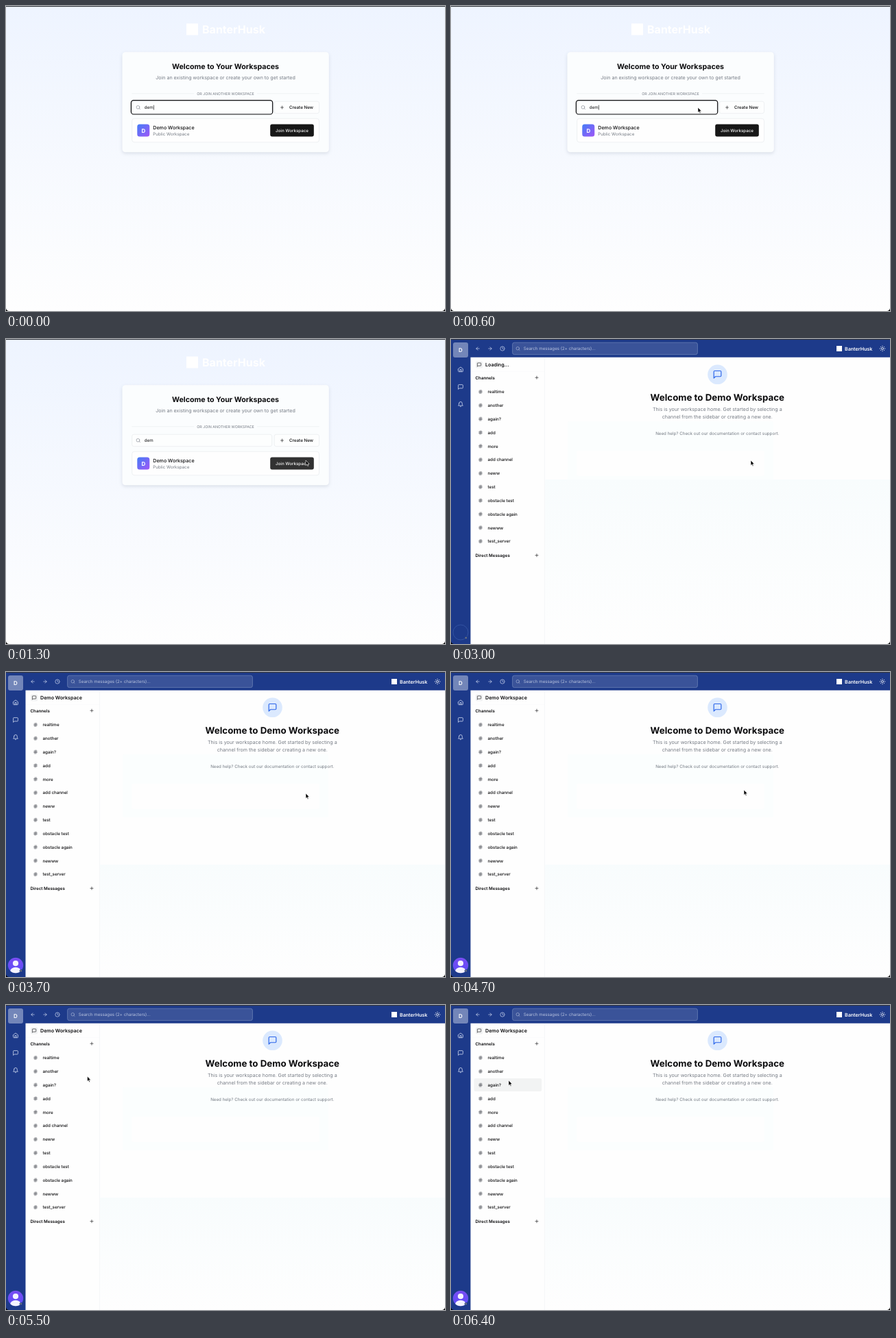
Animation, 640 px wide and 445 px high, one loop 8 s. Source, as an HTML page:

```html
<!DOCTYPE html>
<html lang="en">
<head>
<meta charset="utf-8">
<title>Workspace join</title>
<style>
  html, body { margin: 0; width: 100%; height: 100%; overflow: hidden; background: #fff; }
  svg { display: block; width: 640px; height: 445px; }
  text {
    font-family: Inter, "Liberation Sans", sans-serif;
    font-optical-sizing: none;
    text-rendering: geometricPrecision;
    white-space: pre;
  }
  #card { filter: drop-shadow(0 2px 2.5px rgba(30, 50, 80, .13)); }
</style>
</head>
<body>
<svg id="stage" viewBox="0 0 640 445"></svg>
<script>
const LOOP = 8000, TICK = 100;
const BRAND = 'BanterHusk';
const BLUE = '#1d3a8a', INK = '#0c0c0e', GREY = '#747a83', LINE = '#e5e8eb', PALE = '#dce5f8';
// Type sizes: 12, 14, 16, 24, 30 and 36 px at a 4:9 scale
const XS = 5.333, SM = 6.222, MD = 7.111, XL = 10.667, H2 = 13.333, H1 = 16;

const ICONS = {
  plus: 'M5 12h14M12 5v14',
  search: 'M19 11a8 8 0 1 1-16 0a8 8 0 0 1 16 0M21 21l-4.3-4.3',
  bubble: 'M21 15a2 2 0 0 1-2 2H7l-4 4V5a2 2 0 0 1 2-2h14a2 2 0 0 1 2 2z',
  hash: 'M4 9h16M4 15h16M10 3L8 21M16 3l-2 18',
  home: 'M3 10l9-7 9 7v9a2 2 0 0 1-2 2H5a2 2 0 0 1-2-2zM9 21v-8h6v8',
  bell: 'M6 8a6 6 0 0 1 12 0c0 7 3 9 3 9H3s3-2 3-9M10.3 21a2 2 0 0 0 3.4 0',
  left: 'M12 19l-7-7 7-7M19 12H5',
  right: 'M12 5l7 7-7 7M5 12h14',
  clock: 'M22 12a10 10 0 1 1-20 0a10 10 0 0 1 20 0M12 6v6l4 2',
  sun: 'M16 12a4 4 0 1 1-8 0a4 4 0 0 1 8 0M12 2v2M12 20v2M4.9 4.9l1.4 1.4M17.7 17.7l1.4 1.4M2 12h2M20 12h2M6.3 17.7l-1.4 1.4M19.1 4.9l-1.4 1.4'
};

const text = (x, cy, str, size, weight = 400, fill = INK, anchor = 'start', id = '') =>
  `<text ${id && `id="${id}"`} x="${x}" y="${cy + size * .364}" font-size="${size}" font-weight="${weight}" fill="${fill}" text-anchor="${anchor}">${str}</text>`;

const mid = (x, cy, str, size, weight, fill) => text(x, cy, str, size, weight, fill, 'middle');

const box = (x, y, w, h, r, fill, extra = '') =>
  `<rect x="${x}" y="${y}" width="${w}" height="${h}" rx="${r}" fill="${fill}" ${extra}/>`;

const edge = (color, width = .6) => `stroke="${color}" stroke-width="${width}"`;

const icon = (name, cx, cy, size, color) =>
  `<path d="${ICONS[name]}" transform="translate(${cx - size / 2} ${cy - size / 2}) scale(${size / 24})" fill="none" stroke="${color}" stroke-width="2" stroke-linecap="round" stroke-linejoin="round"/>`;

const channels = ['realtime', 'another', 'again?', 'add', 'more', 'add channel', 'neww', 'test',
  'obstacle test', 'obstacle again', 'newww', 'test_server'];
const rowY = i => 77 + i * 19.83;

const defs = `<defs>
  <linearGradient id="sky" x2="0" y2="1"><stop stop-color="#eef4ff"/><stop offset="1" stop-color="#fefefe"/></linearGradient>
  <linearGradient id="tile" x2="1" y2="1"><stop stop-color="#437df6"/><stop offset="1" stop-color="#a056f7"/></linearGradient>
  <linearGradient id="face" x2="0" y2="1"><stop stop-color="#7a4df3"/><stop offset="1" stop-color="#5b4cf8"/></linearGradient>
  <linearGradient id="mist" x2="0" y2="1"><stop stop-color="#f8fcfd"/><stop offset="1" stop-color="#fefefe"/></linearGradient>
  <clipPath id="round"><circle cx="14" cy="428" r="11.2"/></clipPath>
</defs>`;

const lobby = `<g id="lobby">
  ${box(0, 0, 640, 445, 0, 'url(#sky)')}
  ${box(263, 25.5, 17, 17, 0, '#fff')}
  ${text(286, 34, BRAND, H1, 700, '#fff')}
  <g id="card">${box(169.5, 67.3, 301.3, 146, 4.5, '#fbfdfe')}</g>
  ${mid(320, 88, 'Welcome to Your Workspaces', XL, 700)}
  ${mid(320, 104.7, 'Join an existing workspace or create your own to get started', MD, 400, GREY)}
  <path d="M183.5 127.8H274M366 127.8H456.5" ${edge(LINE)}/>
  ${mid(320, 127.8, 'OR JOIN ANOTHER WORKSPACE', XS, 400, GREY)}
  ${box(183.7, 139.2, 204, 17.5, 2.7, '#fdfefe', edge(LINE))}
  <g id="focus">
    ${box(182.4, 137.7, 206.3, 20.3, 3.6, 'none', edge(INK, 1.2))}
    ${box(215.4, 144.6, .6, 7, 0, INK)}
  </g>
  ${icon('search', 192.8, 148, 7.1, GREY)}
  ${text(201.8, 148, 'dem', SM)}
  ${box(391.2, 139.2, 65.3, 17.5, 2.7, '#fdfefe', edge(LINE))}
  ${icon('plus', 402.5, 148, 7.1, INK)}
  ${text(413, 148, 'Create New', SM, 500)}
  ${box(183.7, 164.2, 272.8, 34.6, 3.5, '#fefefe', edge(LINE))}
  ${box(191.3, 172.5, 18, 18, 3.5, 'url(#tile)')}
  ${mid(200.3, 181.6, 'D', 8, 700, '#fff')}
  ${text(214.3, 177.2, 'Demo Workspace', MD, 500)}
  ${text(214.3, 187, 'Public Workspace', SM, 400, GREY)}
  ${box(385.2, 172.5, 63.6, 18, 2.7, '#171717', 'id="join"')}
  ${mid(417, 181.6, 'Join Workspace', SM, 500, '#fafafa')}
</g>`;

const home = `<g id="home">
  ${box(0, 0, 640, 445, 0, '#fefefe')}
  ${box(170, 120, 300, 92, 3, '#fbfefe')}
  ${box(183, 163, 274, 37, 3.5, '#fefefe')}
  ${box(137, 281, 503, 164, 0, 'url(#mist)', 'id="haze"')}
  ${box(28, 26, 108.3, 419, 0, '#fefefe')}
  <path d="M136.4 27V445" ${edge('#eceef1')}/>
  <path d="M28 47.3H136" ${edge('#f6f7f8')}/>
  ${box(0, 0, 640, 26.7, 0, BLUE)}
  ${box(0, 0, 28.5, 445, 0, BLUE)}
  ${box(3, 5, 22, 22, 3, '#7386b9')}
  ${mid(14, 15.9, 'D', 8, 600, '#fff')}
  ${icon('home', 14, 44.3, 9, PALE)}
  ${icon('bubble', 14, 70, 9, PALE)}
  ${icon('bell', 14, 95.3, 9, PALE)}
  ${icon('left', 39, 14, 7.6, PALE)}
  ${icon('right', 57, 14, 7.6, PALE)}
  ${icon('clock', 75, 14, 7.6, PALE)}
  ${box(89.6, 5.2, 269.8, 17.4, 2.7, '#3a5399', edge('#7287ba', .7))}
  ${icon('search', 97.6, 14, 6.8, '#b9c4df')}
  ${text(105.8, 14.2, 'Search messages (2+ characters)...', SM, 400, '#b9c4df')}
  ${box(562, 10, 8, 8, 0, '#fff')}
  ${text(574, 14.1, BRAND, MD, 600, '#fff')}
  ${icon('sun', 629, 14, 9.4, '#fff')}
  ${box(36, 32.4, 10.2, 10.2, 2, '#f1f2f3')}
  ${icon('bubble', 41.1, 37.6, 7.1, INK)}
  ${text(50, 37.6, 'Loading...', MD, 600, INK, 'start', 'title')}
  ${text(35.5, 56.4, 'Channels', SM, 600)}
  ${icon('plus', 125, 56.3, 7.1, INK)}
  ${box(33.5, 107, 98.7, 19, 2.5, '#f2f3f3', 'id="hover"')}
  ${channels.map((c, i) => icon('hash', 43, rowY(i), 7.1, '#3c4048') + text(53.5, rowY(i), c, SM, 500)).join('')}
  ${text(35.5, 315.7, 'Direct Messages', SM, 600)}
  ${icon('plus', 125, 315.6, 7.1, INK)}
  <circle cx="388.5" cy="51.8" r="14.3" fill="#dbe9fe"/>
  ${icon('bubble', 388.5, 51.8, 14.2, '#2c66ea')}
  ${mid(388.3, 85.5, 'Welcome to Demo Workspace', H2, 700)}
  ${mid(388.3, 102.5, 'This is your workspace home. Get started by selecting a', MD, 400, GREY)}
  ${mid(388.3, 113.3, 'channel from the sidebar or creating a new one.', MD, 400, GREY)}
  ${mid(388.3, 137.4, 'Need help? Check out our documentation or contact support.', SM, 400, GREY)}
  <circle cx="14" cy="428" r="11" fill="none" ${edge('#3c5cab', .7)}/>
  <g id="avatar" clip-path="url(#round)">
    <circle cx="14" cy="428" r="11.2" fill="url(#face)"/>
    <circle cx="14" cy="425" r="4.1" fill="#f4f3ff"/>
    <ellipse cx="14" cy="436.5" rx="7.8" ry="5.8" fill="#f4f3ff"/>
  </g>
  <circle cx="21.8" cy="436" r="1.8" fill="#6b7280" ${edge(BLUE, .8)}/>
</g>`;

const chrome = `
  ${box(0, 0, 640, 1.1, 0, '#34373d')}
  <path d="M0 441V445H4Q0.5 444.5 0 441M640 441V445H636Q639.5 444.5 640 441"/>
  <path id="cursor" d="M0 0V7.4L1.7 5.9 2.8 8.4 4 7.9 2.9 5.4H5.2Z" fill="#000" stroke="#fff" stroke-width=".6" stroke-linejoin="round"/>`;

document.getElementById('stage').innerHTML = defs + lobby + home + chrome;
const $ = id => document.getElementById(id);

// Pointer path: time, x, y
const path = [
  [300, 200, 146], [400, 220, 136], [500, 275, 131], [600, 360, 148], [700, 440, 172],
  [800, 475, 182], [900, 458, 180], [1000, 441, 175], [1100, 437, 177],
  [4000, 437, 177], [4200, 436, 179], [4500, 431, 174], [4600, 431, 174],
  [4700, 427, 172], [4800, 408, 167], [5000, 305, 142], [5200, 190, 117], [5400, 126, 105], [5500, 118.5, 104],
  [5600, 88, 99.5], [5700, 59.5, 103.5], [5900, 59.5, 103.5],
  [6000, 48, 105], [6100, 62, 108], [6200, 86, 109.5], [6300, 92, 110], [6400, 84, 110]
];

function pointAt(t) {
  const i = path.findIndex(p => p[0] > t);
  if (i < 0) return path[path.length - 1].slice(1);
  if (i === 0) return path[0].slice(1);
  const [t0, x0, y0] = path[i - 1], [t1, x1, y1] = path[i];
  const k = (t - t0) / (t1 - t0);
  return [x0 + (x1 - x0) * k, y0 + (y1 - y0) * k];
}

const ramp = (t, from, to) => Math.min(1, Math.max(0, (t - from) / (to - from)));
const show = (id, on) => $(id).setAttribute('visibility', on ? 'visible' : 'hidden');

function draw(now) {
  const t = Math.floor((now % LOOP) / TICK) * TICK;
  const [x, y] = pointAt(t);
  $('cursor').setAttribute('transform', `translate(${x} ${y})`);
  show('cursor', t >= 300);
  show('lobby', t < 3000);
  show('home', t >= 3000);
  show('focus', t < 1300);
  $('join').setAttribute('fill', t < 1100 ? '#171717' : '#323232');
  const top = t < 3100 ? 205 : 281;
  $('haze').setAttribute('y', top);
  $('haze').setAttribute('height', 445 - top);
  $('title').textContent = t < 3400 ? 'Loading...' : 'Demo Workspace';
  $('avatar').setAttribute('opacity', ramp(t, 3400, 3700));
  $('hover').setAttribute('opacity', ramp(t, 6000, 6200));
}

const start = performance.now();
function frame() {
  draw(performance.now() - start);
  requestAnimationFrame(frame);
}
frame();
</script>
</body>
</html>
```
